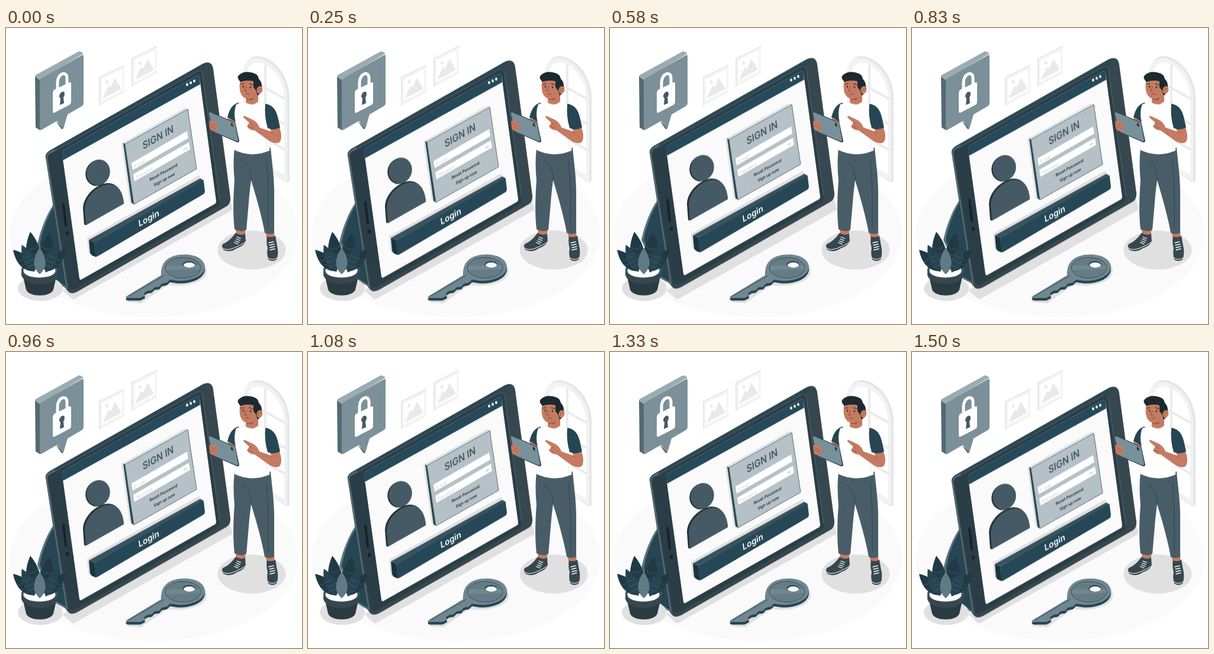
These frames come from a looping animation (500x500 px, 1540 ms). An HTML page:

```html
<!DOCTYPE html>
<html lang="en">
<head>
<meta charset="utf-8">
<title>Sign in</title>
<style>
  html, body { margin: 0; width: 100%; height: 100%; overflow: hidden; background: #fff; }
  svg { display: block; width: 100vw; height: 100vh; }
  text { font-family: Inter, Roboto, sans-serif; }
  .float { animation: float 1540ms linear infinite; }
  @keyframes float {
    0%, 100% { transform: translateY(0); }
    45.45% { transform: translateY(-9.33px); }
    94.16% { transform: translateY(.67px); }
  }
  .line { fill: none; stroke-linecap: round; stroke-linejoin: round; }
  .shade { fill: #e0e0e0; }
  .ink { fill: #263238; }
  .slate { fill: #455a64; }
  .teal { fill: #264653; }
  .skin { fill: #c47b62; }
</style>
</head>
<body>
<svg viewBox="0 0 500 500">
  <defs>
    <g id="picture">
      <path fill="#e6e6e6" d="M0 21 43 0V46L0 69Z"/>
      <path fill="#f5f5f5" d="M2 22 43 2V45L2 67Z"/>
      <path fill="#fff" d="M5 25 39 8V43L5 61Z"/>
      <path fill="#e9e9e9" d="M7 55 16 36 20 38 27 22 37 39 37 41 7 57Z"/>
      <ellipse cx="14" cy="29" rx="2.5" ry="3" fill="#ebebeb"/>
    </g>
    <g id="leaf">
      <path d="M0 0C-14-12-13-30 0-48C13-30 14-12 0 0Z"/>
      <path class="line" stroke="#6f868e" stroke-width=".6" opacity=".55" d="M-8-14Q-4-7 0-12 4-7 8-14M-9-22Q-4-15 0-20 4-15 9-22M-7-30Q-3-23 0-28 3-23 7-30"/>
    </g>
    <g id="laces" class="line" stroke="#fff" stroke-width="1.3">
      <path d="M0 0 8-2M1 4 9 2M2 8 10 6M2 12 10 10"/>
    </g>
    <path id="key" d="M202 454 263 417C260 400 270 386 293 383C318 380 336 390 336 404C335 419 313 428 290 427L277 425 272 430 263 432 259 437 251 438 246 443 239 444 233 448 235 452 227 456H205Z"/>
  </defs>

  <ellipse cx="250" cy="348" rx="244" ry="141" fill="#fafafa"/>

  <!-- window -->
  <path fill="#e6e6e6" d="M402 216V76C402 53 418 42 437 50C461 59 479 88 479 117V259L474 261Z"/>
  <path fill="#f2f2f2" d="M400 217V78C400 55 416 46 434 53C458 62 475 90 475 118V260Z"/>
  <path fill="#fff" d="M407 211V82C407 64 418 54 433 60C454 68 470 92 470 119V248Z"/>
  <path class="line" stroke="#ebebeb" stroke-width="4" d="M438 63V228M407 84 470 119M407 127 470 162M407 170 470 205"/>

  <use href="#picture" x="157" y="62"/>
  <use href="#picture" x="212" y="30"/>

  <!-- lock bubble -->
  <path fill="#536a73" d="M49 82 58 88V173L50 168ZM84 157 91 163 97 170 94 171Z"/>
  <path fill="#9babb2" d="M49 82Q49 80 51 79L122 40Q124 39 126 40L131 43 57 88Z"/>
  <path fill="#7b9098" d="M57 90Q57 87 60 85L128 46Q131 44 131 48V127Q131 130 128 132L104 146 97 170 86 157 60 172Q57 173 57 170Z"/>
  <path class="line" stroke="#fff" stroke-width="5" d="M87 104V92C87 77 103 71 103 85V97"/>
  <path fill="#fff" d="M79 109Q79 106 82 104L107 92Q110 91 110 94V125Q110 128 107 130L82 143Q79 144 79 141Z"/>
  <path fill="#455a64" d="M90 116C90 108 99 104 99 111Q99 115 97 117L98 127 91 130 92 119Z"/>

  <ellipse class="shade" cx="415" cy="375" rx="57.5" ry="33"/>
  <path class="shade" d="M95 443 112 458Q117 458 122 454L383 307 377 285Z"/>

  <!-- tablet -->
  <g class="float">
    <path fill="#5d747e" d="M81 297C70 312 58 340 53 366L82 429 104 441 110 430Z"/>
    <path class="teal" d="M83 299C72 314 61 342 57 366L85 427 104 438Z"/>
    <path fill="#37474f" d="M67 219Q66 212 74 207L328 63Q339 56 345 59.500Q349 62 350 69L379 286Q380 296 373 301L121 445Q110 451 105 445L101 440Z"/>
    <path fill="#2c4753" d="M67 219Q66 212 74 207L328 63Q336 58 342 59L329 74 80 214 71 221Z"/>
    <path fill="#2b3d46" d="M71 221Q70 215 77 211L322 74Q330 70 332 79L361 291Q362 299 355 303L119 439Q108 445 106 436Z"/>
    <path class="line" stroke="#637b85" stroke-width="1.500" d="M103 440 69 221Q68 214 75 210L82 206"/>
    <path class="line" stroke="#5c727c" stroke-width=".8" d="M77 211 322 74Q330 70 332 79L361 291"/>
    <path fill="#fafafa" d="M95 214Q94 208 99 205L322 81Q326 79 327 84L355 292Q355 296 353 297L127 425Q125 426 124 423Z"/>
    <path fill="#264a59" d="M96 222Q92 209 99 205L322 81Q326 79 327 84L328 95 97 223Z"/>
    <g fill="#fff">
      <ellipse cx="306" cy="95.500" rx="1.900" ry="2.500"/>
      <ellipse cx="312" cy="92.500" rx="1.900" ry="2.500"/>
      <ellipse cx="318" cy="89.500" rx="1.900" ry="2.500"/>
    </g>
    <path class="line" stroke="#172329" stroke-width="4" d="M97 298 101 333"/>
    <ellipse cx="103.500" cy="347" rx="2.600" ry="3.300" fill="#172329"/>

    <!-- avatar -->
    <ellipse class="ink" cx="154" cy="245" rx="19.500" ry="22" transform="rotate(18 154 245)"/>
    <ellipse class="slate" cx="156" cy="244" rx="19.500" ry="22" transform="rotate(18 156 244)"/>
    <path class="ink" d="M132 332 130 305C130 285 151 264 171 262C188 261 197 277 199 296L135 333Z"/>
    <path class="slate" d="M135 333 133 307C133 286 153 266 173 264C190 263 198 278 199 297Z"/>

    <!-- form -->
    <path class="shade" d="M195 195 302 135 310 140 214 298 209 294Z"/>
    <path fill="#dfe5e8" d="M198 194 304 135 308 137 201 196Z"/>
    <path class="teal" d="M198 194 201 196 216 298 212 295Z"/>
    <path fill="#b5c1c7" stroke="#4d646e" stroke-width=".9" d="M201 196 307 137 322 238 216 298Z"/>
    <path fill="#fff" d="M212 228 306 174 308 186 214 240ZM215 247 309 193 311 205 217 259Z"/>
    <g transform="matrix(.866 -.5 .13 1.050 231.500 205.500)">
      <text class="slate" font-size="16.200" font-weight="600">SIGN IN</text>
    </g>
    <g fill="#c9cfd2" font-size="7">
      <text transform="matrix(.866 -.478 .13 .98 217 236)">E-mail</text>
      <text transform="matrix(.866 -.478 .13 .98 219.500 255)">Password</text>
    </g>
    <g class="line" stroke="#c9cfd2" stroke-width=".8">
      <path d="M300 206Q302 201 306 202Q304 207 300 206Z"/>
      <circle cx="303" cy="204" r=".8"/>
    </g>
    <g class="ink" font-size="7" font-weight="600">
      <text transform="matrix(.866 -.478 .13 .98 243 259)">Reset Password</text>
      <text transform="matrix(.866 -.478 .13 .98 250 268)">Sign up now</text>
    </g>

    <!-- login button -->
    <path class="shade" d="M137 355 326 249 331 257 143 384 139 379Z"/>
    <path fill="#38535f" d="M140 358 328 254 334 257 149 362Z"/>
    <path fill="#1b343f" d="M140 358 149 362 152 387 145 384 142 380Z"/>
    <path fill="#264856" d="M149 362 331 258Q334 256 334 259L336 276Q336 279 333 281L154 386Q151 387 151 384Z"/>
    <text transform="matrix(.866 -.478 .13 .98 224.500 336)" font-size="15" font-weight="600" fill="#fff">Login</text>
  </g>

  <!-- key -->
  <path class="shade" d="M204 463 262 424C264 398 286 386 310 388C338 391 347 412 332 424C317 436 288 437 273 434L235 460 229 465Z"/>
  <use href="#key" class="teal" y="4.500"/>
  <use href="#key" class="teal" y="2.500"/>
  <use href="#key" fill="#708791"/>
  <path class="line" stroke="#314b57" stroke-width="1" d="M207 453 267 418"/>
  <ellipse cx="299" cy="405" rx="30" ry="17.500" fill="#657c86" stroke="#38515c" stroke-width="1"/>
  <path fill="#7f949c" d="M271 401 328 401 329 407 271 409Z" opacity=".5"/>
  <ellipse class="teal" cx="309" cy="399.500" rx="10.500" ry="5.800"/>
  <ellipse cx="309.500" cy="400.500" rx="9.500" ry="4.400" fill="#fafafa"/>

  <!-- plant -->
  <ellipse class="shade" cx="58" cy="440" rx="38" ry="21"/>
  <path fill="#2b3b43" d="M29 420 34 442C39 455 75 455 80 442L85 420Z"/>
  <path fill="#37474f" d="M26 406V417C30 437 83 438 87 417V406Z"/>
  <ellipse cx="56.500" cy="408" rx="30.500" ry="14.500" fill="#455a64"/>
  <ellipse cx="56.500" cy="410" rx="27" ry="11.500" fill="#fff"/>
  <g fill="#1f3945">
    <use href="#leaf" transform="translate(50 408) rotate(-8) scale(1.150 1.340)"/>
    <use href="#leaf" transform="translate(64 408) rotate(9) scale(1.150 1.300)"/>
    <use href="#leaf" transform="translate(47 411) rotate(-44) scale(.950 1.050)"/>
    <use href="#leaf" transform="translate(67 411) rotate(42) scale(.950 1.050)"/>
  </g>
  <g fill="#264350">
    <use href="#leaf" transform="translate(48 412) rotate(-25) scale(.900 1.050)"/>
    <use href="#leaf" transform="translate(67 413) rotate(23) scale(.900 1.050)"/>
  </g>
  <use href="#leaf" transform="translate(57 416) scale(.950 .930)" fill="#607a85"/>

  <!-- shoes and legs -->
  <path class="skin" d="M388 337H405L403 353H389ZM438 342H453L454 358H441Z"/>
  <path fill="#37474f" d="M388 346Q397 352 404 347L405 361Q400 369 390 372Q379 380 368 375Q363 371 366 365Q377 361 388 346Z"/>
  <path class="line" stroke="#fff" stroke-width="1" d="M365 371Q372 377 384 372Q399 366 405 361"/>
  <use href="#laces" transform="translate(390 353) rotate(36) scale(.850)"/>
  <path fill="#37474f" d="M441 352Q448 355 455 351Q457 363 459 373Q460 385 457 391Q450 396 443 391Q440 381 442 372Q439 362 441 352Z"/>
  <path class="line" stroke="#fff" stroke-width="1" d="M442 388Q450 394 458 388"/>
  <use href="#laces" x="444" y="363"/>
  <path fill="#485d67" d="M386 203 447 202C449 225 453 251 453 276V346Q445 350 437 346Q431 312 414 257Q411 280 410 295L406 341Q396 346 386 340C383 313 384 284 386 258Q383 226 386 203Z"/>
  <path class="line" stroke="#34464f" stroke-width="1" d="M414 257Q414 230 398 225M440 222Q444 265 443 337"/>

  <!-- torso -->
  <path class="teal" d="M393 126Q379 129 374 151L389 164 400 139Z"/>
  <path class="skin" d="M376 151 388 159 382 173 369 166Z"/>
  <path fill="#fff" stroke="#e5e5e5" stroke-width=".5" d="M389 129 405 124Q415 130 426 122L441 129Q450 139 447 155L445 207Q415 220 386 206L388 159Q384 143 389 129Z"/>
  <path class="line" stroke="#e6e6e6" stroke-width="1" d="M388 160Q392 175 389 192M443 161Q437 185 441 202M405 126Q416 135 427 125"/>

  <!-- head -->
  <path class="skin" d="M406 111 426 103 426 124Q417 133 405 126Z"/>
  <path fill="#9c5946" d="M406 118Q415 119 421 112L416 122 406 121Z"/>
  <path class="skin" d="M396 88Q411 80 426 91V108Q421 119 410 120Q399 119 396 109Q393 98 396 88Z"/>
  <path fill="#1d2930" d="M396 91Q389 84 393 80Q401 72 414 75Q426 77 427 86Q433 91 432 103Q430 112 425 114L422 105 418 100 418 90Q407 87 396 91Z"/>
  <ellipse class="skin" cx="428.500" cy="104.500" rx="5" ry="6.500" transform="rotate(15 428 104)"/>
  <path class="line" stroke="#965442" stroke-width=".8" d="M426 107Q427 101 431 102"/>
  <g class="ink">
    <ellipse cx="401" cy="99" rx="1.200" ry="1.700"/>
    <ellipse cx="413" cy="100" rx="1.200" ry="1.700"/>
  </g>
  <path class="line" stroke="#263238" stroke-width="1.200" d="M397 95 402 94M411 94 417 96"/>
  <path class="line" stroke="#87483a" stroke-width="1" d="M406 99 403 106 407 107M405 112Q408 110 411 112"/>

  <!-- device and arms -->
  <path fill="#37474f" d="M342 144Q341 141 345 141.500L384 158Q387 160 388 163L394 190Q394 194 390 193L353 177Q349 175 348 172Z"/>
  <path fill="#78909a" d="M343 145Q342 142 345 142.500L383 159Q386 160 387 163L392 189Q392 192 389 191L353 176Q350 175 349 172Z"/>
  <path class="ink" d="M380 160 383 162 384 167 380 165Z"/>
  <path class="skin" d="M343 158Q348 154 353 158L358 163Q360 166 355 166L357 169Q359 173 354 173Q347 176 344 169Z"/>
  <path class="line" stroke="#965442" stroke-width=".8" d="M346 161 355 166M346 166 354 170"/>
  <path class="skin" d="M446 169 462 168Q468 186 462 193Q456 197 445 191L420 173Q411 173 407 166L411 160 402 152Q399 148 404 149L417 155Q425 159 428 168L448 175Z"/>
  <path class="line" stroke="#965442" stroke-width=".8" d="M411 160 416 163M409 166 417 169M447 176 451 178"/>
  <path class="teal" d="M438 128Q454 130 459 150L463 168Q453 174 442 169Q436 150 438 128Z"/>
</svg>
</body>
</html>
```
